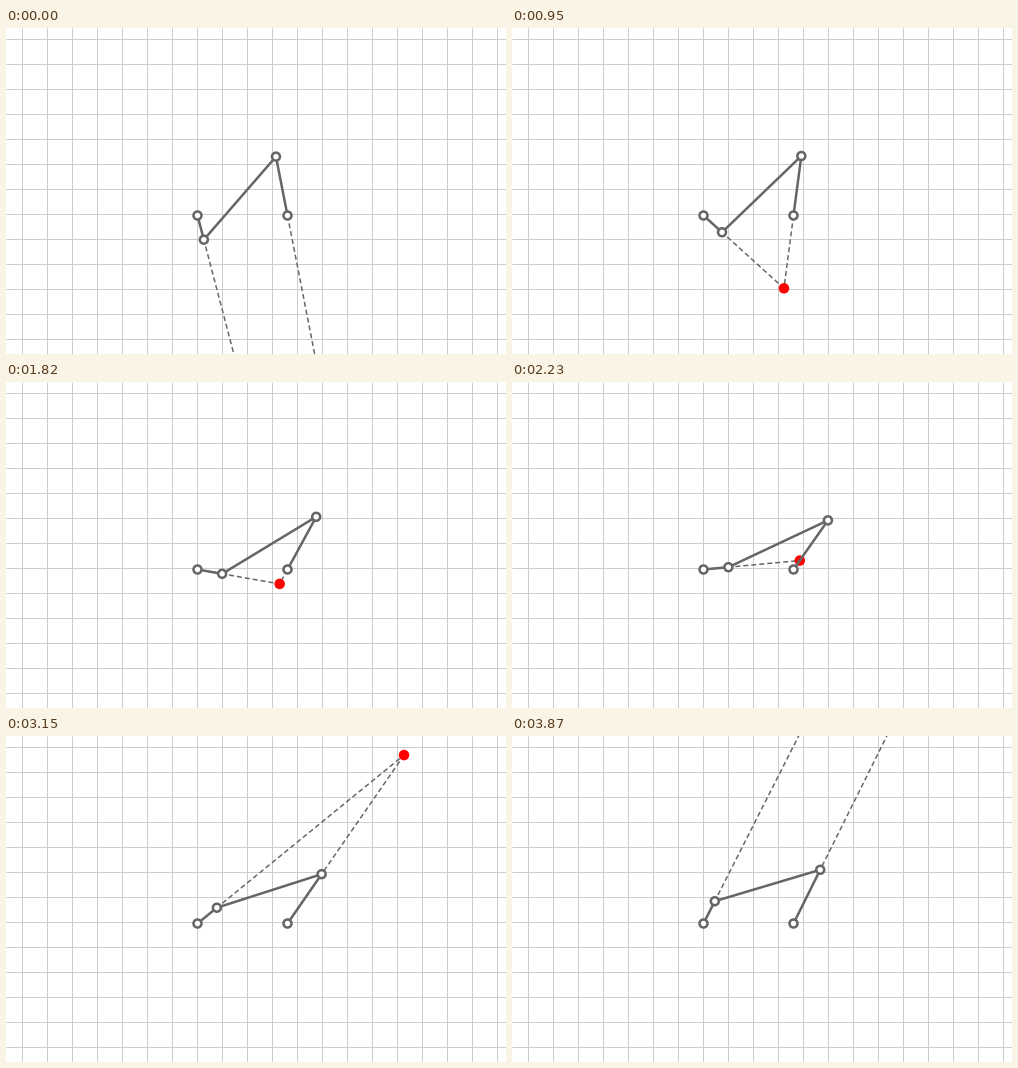
A matplotlib script that plays this animation: 500x326 px, repeating every 3.9 s.

```python
import numpy as np
import matplotlib.pyplot as plt
from matplotlib.animation import FuncAnimation
from matplotlib.patches import Circle

W, H, DPI = 500, 326, 64
PX = 72 / DPI                      # points per pixel
LOOP, TICK, STEPS = 3900, 10, 84   # ms, ms, poses per loop
GREY, GRID, RED = "#666666", "#cccccc", "#ff0000"

# four-bar linkage, lengths in pixels
A = np.array([191.5, 187.5])
B = np.array([281.5, 187.5])
CRANK, COUPLER, ROCKER = 25, 110, 60


def unit(angle):
    return np.array([np.cos(angle), np.sin(angle)])


def crank_angle(step):
    """Steady turn, a little slower at both ends (y points down)."""
    return np.radians(np.interp(step, [0, 11, 68, 83], [75.3, 57.4, -39.2, -63.1]))


def solve(angle):
    """Joints C and D, and the point where lines AC and BD cross."""
    u = unit(angle)
    c = A + CRANK * u
    to_c = c - B
    dist = np.hypot(*to_c)
    corner = np.arccos((dist**2 + ROCKER**2 - COUPLER**2) / (2 * dist * ROCKER))
    v = unit(np.arctan2(to_c[1], to_c[0]) + corner)
    d = B + ROCKER * v
    s, _ = np.linalg.solve(np.column_stack([u, -v]), B - A)
    return c, d, A + s * u


def ray(start, end, reach=600):
    """Segment towards end, shortened when end is far off the stage."""
    delta = end - start
    return start, start + delta * min(1, reach / np.hypot(*delta))


fig = plt.figure(figsize=(W / DPI, H / DPI), dpi=DPI, facecolor="white")
ax = fig.add_axes([0, 0, 1, 1])
ax.set_xlim(0, W)
ax.set_ylim(H, 0)
ax.axis("off")

# whole numbers snap to the pixel that starts there
ax.vlines(np.arange(16, W, 25), 0, H, color=GRID, lw=PX, zorder=1)
ax.hlines(np.arange(11, H, 25), 0, W, color=GRID, lw=PX, zorder=1)

dash_style = dict(color=GREY, lw=1.5 * PX, zorder=2, dash_capstyle="butt",
                  linestyle=(0, (5 / 1.5, 3 / 1.5)))
dashes = [ax.plot([], [], **dash_style)[0] for _ in range(2)]
centre = ax.add_patch(Circle((0, 0), 5.25, fc=RED, ec="none", zorder=3))
links, = ax.plot([], [], color=GREY, lw=2.5 * PX, zorder=4,
                 solid_joinstyle="round")
joints = [ax.add_patch(Circle((0, 0), 4, fc="white", ec=GREY, lw=2.5 * PX,
                              zorder=5)) for _ in range(4)]


def draw(frame):
    # each pose is held for a moment, the first one slightly shorter
    step = int(frame * TICK * STEPS / LOOP + 0.21)
    c, d, cross = solve(crank_angle(step))
    links.set_data(*np.transpose([A, c, d, B]))
    for joint, p in zip(joints, (A, c, d, B)):
        joint.center = p
    for dash, pivot in zip(dashes, (A, B)):
        dash.set_data(*np.transpose(ray(pivot, cross)))
    centre.center = cross
    return [*dashes, centre, links, *joints]


anim = FuncAnimation(fig, draw, frames=LOOP // TICK, interval=TICK,
                     repeat=True, repeat_delay=0, blit=False)
plt.show()
```
